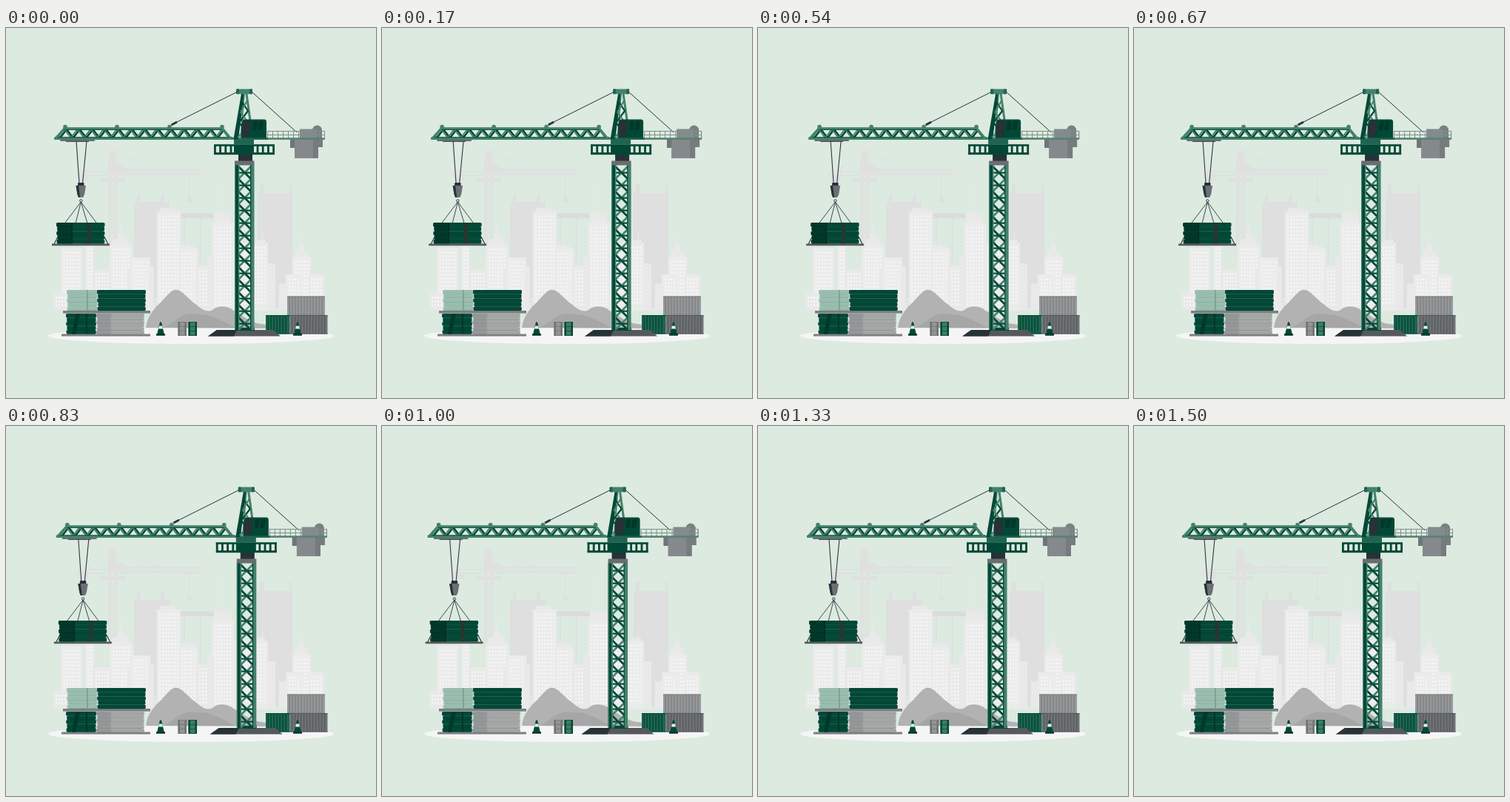
An HTML page for the animation above (1.54 s loop, 500x500 px).

```html
<!DOCTYPE html>
<html lang="en">
<head>
<meta charset="utf-8">
<title>Tower crane</title>
<style>
  html, body { margin: 0; width: 100%; height: 100%; overflow: hidden; background: #dceae0; }
  svg { display: block; width: 100%; height: 100%; }
</style>
</head>
<body>
<svg id="stage" viewBox="0 0 500 500">
  <defs>
    <pattern id="win" width="4" height="5" patternUnits="userSpaceOnUse">
      <rect x="1" y="1.2" width="2.2" height="2.8" fill="#f5f5f5"/>
    </pattern>
  </defs>
</svg>
<script>
const svg = document.getElementById('stage');
const LIGHT = '#45816c', MID = '#1f6450', GREEN = '#024836', DEEP = '#01382a', INK = '#263238';

const rect = (x, y, w, h, fill, rx = 0) =>
  `<rect x="${x}" y="${y}" width="${w}" height="${h}" fill="${fill}" rx="${rx}"/>`;
const shape = (d, fill) => `<path d="${d}" fill="${fill}"/>`;
const line = (d, color, w = 1) =>
  `<path d="${d}" fill="none" stroke="${color}" stroke-width="${w}" stroke-linejoin="round"/>`;
const dot = (x, y, r, fill) => `<circle cx="${x}" cy="${y}" r="${r}" fill="${fill}"/>`;
const group = (body, id = '') => `<g${id && ` id="${id}"`}>${body}</g>`;
const repeat = (n, fn) => Array.from({ length: n }, (_, i) => fn(i)).join('');

// Zigzag along x between two heights
function zigzag(x, step, n, y0, y1) {
  return repeat(n + 1, i => `${i ? 'L' : 'M'}${x + i * step} ${i % 2 ? y1 : y0}`);
}

function tower(x, y, w, bottom, fill = '#ebebeb', windows = true) {
  let out = rect(x, y, w, bottom - y, fill);
  if (windows) {
    const rows = Math.floor((bottom - y - 8) / 5) * 5, cols = Math.floor((w - 4) / 4) * 4;
    out += `<g transform="translate(${x + (w - cols) / 2} ${y + 4})">${rect(0, 0, cols, rows, 'url(#win)')}</g>`;
  }
  return out;
}

// Faint wall panels and floor line
function wall() {
  const c = '#dfeae3';
  return [38, 254].map(x =>
    `<rect x="${x}" y="55" width="204" height="281" rx="4" fill="none" stroke="${c}" stroke-width=".7"/>`).join('') +
    line('M0 382H500', c, .7);
}

function farCrane() {
  const c = '#dfe0df';
  return group(
    line('M139.5 178V300M148.5 178V300', c, 2.5) +
    repeat(12, i => line(`M140 ${180 + i * 10}l8 10m0 -10l-8 10`, c, 1.5)) +
    shape('M139 166h9v3l3 28h-14l2 -28z', c) +
    rect(150, 184, 9, 12, c, 1.5) +
    line('M148 198H263M156 191H259L263 198', c, 2.4) +
    line(zigzag(158, 5, 20, 198, 191), c, 1.5) +
    line('M95 199H138M97 194H137', c, 1.5) +
    rect(98, 197, 13, 10, c) +
    line('M140 168L106 194M148 168L204 190', c, .7) +
    rect(127, 203, 35, 5, c) +
    line('M247 199V229M249 199V229', c, .7) +
    rect(244.5, 229, 6.5, 7, c, 1.5)
  );
}

function city() {
  const far = '#dfdfdf', near = '#e9e9e9';
  return farCrane() +
    shape('M173 235H177V224H181V235H209V225H214V235H221V365H173z', far) +
    shape('M340 223H343V211H348V223H383V210H386V223H387V365H340z', far) +
    rect(236, 250.5, 45, 6.5, '#dbdcdb') + rect(240, 257, 1.5, 60, far) + rect(262, 257, 1.5, 60, far) +
    rect(361, 303, 7, 75, far) +
    rect(154.5, 262, 1, 18, near) + rect(150, 278, 11, 8, near) + rect(144, 285, 22, 9, near) +
    tower(140, 293, 31, 382) +
    tower(74, 297, 29, 382) + tower(107, 292, 12, 382) +
    tower(118, 326, 24, 382, near) + tower(64, 358, 20, 382, near) +
    tower(168, 310, 27, 382) + rect(164, 325, 4, 57, near) + rect(195, 322, 5, 60, near) +
    rect(208, 243, 21, 7, near) + tower(204, 248, 32, 382) +
    rect(243, 278, 1, 17, near) + rect(237, 293, 17, 6, near) + tower(233, 298, 26, 382) +
    tower(258, 322, 16, 382, near) +
    rect(291.5, 205, 1.2, 46, near) + rect(281, 250, 23, 15, near) + tower(278, 263, 30, 382) +
    tower(272, 308, 10, 382, near, false) +
    rect(346, 274, 1, 17, near) + rect(337, 286, 13, 5, near) + tower(308, 290, 46, 382) +
    tower(354, 318, 10, 382, near, false) +
    rect(398.5, 280, 1, 14, near) + rect(395, 292, 8, 9, near) + rect(390, 300, 18, 11, near) +
    tower(387, 309, 25, 382) + tower(378, 333, 22, 382) + tower(408, 333, 22, 382) +
    tower(369, 345, 10, 382, near, false);
}

function hills() {
  return shape('M189 405C191 388 202 377 211 369C218 362 223 354 230 354C239 355 246 367 258 375C266 382 274 386 281 380C287 375 299 376 306 381C319 388 330 398 345 400C356 401 362 404 365 406z', '#b2b2b2') +
    shape('M212 405C224 401 234 389 243 387C252 385 259 388 268 387C283 390 300 400 310 405z', '#a6a6a6') +
    line('M211 369C218 362 223 354 230 354C239 355 246 367 258 375C266 382 274 386 281 380C287 375 299 376 306 381', '#9c9c9c', .5);
}

// Stacked sheets with uneven ends
function stack(x, y, w, h, n, fill, edge) {
  const s = h / n;
  return repeat(n, i => {
    const d = [0, 1.2, .3, 1.4, .6][i % 5];
    return rect(x + d, y + i * s, w - d * 1.4, s, fill, 1.6) +
      line(`M${x + d + 1} ${y + (i + 1) * s - .3}H${x + w - d - 1}`, edge, .6);
  });
}

function piles() {
  return rect(75, 413.5, 120, 3, '#7b7f80') +
    stack(122, 386, 65, 27.5, 6, '#a5a7a7', '#858989') +
    stack(122.5, 386, 20, 27.5, 6, '#959898', '#7f8383') +
    stack(81, 386, 41, 27.5, 5, GREEN, DEEP) +
    shape('M94 386H100L94 413.5H89z', DEEP) + rect(108, 386, 2, 27.5, DEEP) +
    rect(77, 382, 118, 3.6, '#7b7f80') +
    stack(82, 354, 42, 28, 5, '#9abdaf', '#6d9a89') +
    rect(109, 354, 2, 28, '#7da595') +
    stack(123, 354, 66, 28, 5, GREEN, DEEP);
}

function cone(x) {
  return shape(`M${x - 1} 397.5h2l3.8 16h-9.6z`, GREEN) +
    shape(`M${x - 2.1} 402.4h4.2l.9 4h-6z`, '#e8eeea') +
    rect(x - 6, 413, 12, 2.8, DEEP, .5);
}

function barrel(x, fill, shade) {
  return rect(x, 397, 11.5, 19, fill, 1) + rect(x, 397, 2.5, 19, shade, 1) + rect(x + 9, 397, 2.5, 19, shade, 1) +
    repeat(4, i => rect(x, 397 + i * 6.1, 11.5, .7, shade));
}

function container(x, y, w, h, fill, shade) {
  return rect(x, y, w, h, fill) +
    repeat(Math.floor((w - 2) / 4), i => rect(x + 2.4 + i * 4, y + 1.5, 1.4, h - 3, shade)) +
    rect(x, y, w, 1.2, shade) + rect(x, y + h - 1.2, w, 1.2, shade);
}

function yard() {
  return `<ellipse cx="250" cy="416" rx="193" ry="11" fill="#f5f5f5"/>` + hills() + piles() +
    cone(209) + barrel(232.5, '#929494', '#6f7373') + barrel(246.5, '#3d7c67', GREEN) +
    container(380, 362.5, 51, 26, '#969899', '#7e8182') +
    container(351, 388, 32.5, 25.5, MID, GREEN) +
    container(383.5, 388, 51, 25.5, '#6f7375', '#565b5e');
}

function mast() {
  const cell = 17;
  return repeat(13, i => {
    const y = 187 + i * cell;
    return line(`M314 ${y}L331 ${y + cell}`, GREEN, 2.8) +
      line(`M331 ${y}L314 ${y + cell}`, LIGHT, 2.6) +
      rect(314, y + cell / 2 - 1, 17, 2.2, GREEN);
  }) +
    rect(309, 185, 5, 223, GREEN) + rect(309, 185, 1.2, 223, LIGHT) +
    rect(314, 185, 1.4, 223, LIGHT) +
    rect(331, 185, 4.5, 223, LIGHT) + rect(330, 185, 1.3, 223, GREEN);
}

function base() {
  return shape('M273 416.5L285 408H361L371 416.5z', '#55595b') +
    shape('M273 416.5L285 408H312L308 416.5z', INK) + rect(311, 405, 25, 4, GREEN);
}

function deck() {
  return rect(308, 150, 27, 9, MID) + rect(314, 169, 19, 11, INK) +
    rect(309, 179.5, 26.5, 6, '#696d72') +
    rect(308, 157, 27, 14, GREEN) +
    rect(281, 157, 82, 2.8, GREEN) + rect(281, 168.2, 82, 3, GREEN) +
    repeat(12, i => rect(281 + i * 7.2, 157, 2.8, 14, GREEN)) +
    line('M281 157.4H363', LIGHT, .7);
}

function head() {
  return shape('M318 89H322L314 150H307.5z', GREEN) +
    line('M322 89L317 150', LIGHT, 1.6) + line('M325 89L333.5 150', LIGHT, 3) +
    line('M319 100L327 112L315 128L331 146', GREEN, 2.2) +
    line('M326 98L317 114L329 130L313 148', LIGHT, 2) +
    rect(311, 82.5, 22, 6.8, LIGHT, 1) + rect(311, 82.5, 4, 6.8, MID, 1) + rect(329, 82.5, 4, 6.8, MID, 1);
}

function cab() {
  return shape('M320 123.5H349Q352 123.5 352 127V150.5H318V132z', GREEN) +
    shape('M321 125H331L329 147H318.5V133z', INK) +
    shape('M334 126H340L338 138H333z', DEEP) + shape('M342 126H348L346 138H340z', DEEP) +
    rect(318, 148.5, 36, 2.5, MID);
}

function jib() {
  return line(zigzag(73, 8.875, 25, 148.5, 137), GREEN, 2.6) +
    line(zigzag(70, 8.875, 26, 148.5, 136.5), LIGHT, 2) +
    rect(78, 134.2, 215, 3.6, LIGHT) + line('M79 137.4H293', GREEN, .9) +
    rect(65, 147.8, 253, 3.2, LIGHT) + line('M66 147.8H306', GREEN, 1) +
    line('M66.5 149.5L79.5 135M292 135L304 149.5', LIGHT, 2.8) +
    [80, 150, 221, 292].map(x => dot(x, 133.5, 2.8, LIGHT)).join('');
}

function counter() {
  const rail = '#7e9189';
  return dot(420.5, 138, 6.5, '#7b7f82') + rect(414, 137, 13, 12, '#7b7f82') +
    rect(397, 136.5, 23, 14, '#85898c') +
    shape('M384 150H428V161H422V176H390V162H384z', '#85898c') +
    shape('M415 150H428V161H422V176H415z', '#777b7f') + rect(384, 150, 6, 12, '#70747a') +
    line('M353 139.5H430.5V150M353 144.5H430', rail, 1) +
    repeat(12, i => line(`M${353.5 + i * 7} 139V150`, rail, 1)) +
    rect(352, 148.3, 79, 2.6, '#588272');
}

function hoist() {
  const cord = '#30383c';
  return rect(73, 151, 47, 2, '#6b7074', 1) + rect(81, 152.5, 31, 1.5, '#50565a') +
    line('M95 153L99 210M109 153L103.5 210', cord, 1.1) +
    rect(97, 209, 8.5, 5, INK, 1) + shape('M94.5 213H108L106 225L104 229H98L96.5 225z', '#6b6f75') +
    shape('M94.5 213H98L100 229H98L96.5 225z', INK) +
    `<circle cx="101.3" cy="233.5" r="1.7" fill="none" stroke="${cord}"/>` +
    line('M101.3 235L80 263L65 292M101.3 235L94 264M101.3 235L110 264M101.3 235L122 263L138 292', cord, .9) +
    stack(68, 263, 65.5, 28.5, 5, GREEN, DEEP) +
    stack(68.4, 263, 22, 28.5, 5, DEEP, '#022b21') +
    rect(109.5, 263, 5.5, 28.5, '#26372f') + rect(88.5, 263, 1.2, 28.5, '#022b21') +
    line('M70 282L65 292M133 282L138 292', cord, .9) +
    rect(62, 291.5, 78, 2.7, '#555c5f');
}

function crane() {
  return line('M229 128L313 86M333 87L393 141', INK, 1) + line('M223.5 131L231 127', INK, 2.6) +
    counter() + base() + mast() + jib() + head() + deck() + cab() + hoist();
}

svg.insertAdjacentHTML('beforeend', wall() + city() + yard() + group(crane(), 'crane') + cone(394));

const rig = document.getElementById('crane');
const LOOP = 1540, FPS = 24, SHAKE = 1500;
const stops = [0, 1, 2, -4, 4, -4, 4, -4, 2, 1, 0];

// cubic-bezier(.25, .1, .25, 1)
function ease(x) {
  let lo = 0, hi = 1;
  for (let i = 0; i < 24; i++) {
    const s = (lo + hi) / 2, r = 1 - s;
    if (.75 * r * r * s + .75 * r * s * s + s ** 3 < x) lo = s; else hi = s;
  }
  const r = 1 - lo;
  return .3 * r * r * lo + 3 * r * lo * lo + lo ** 3;
}

function offset(ms) {
  const p = ms / SHAKE * 10, i = Math.min(9, Math.floor(p));
  return stops[i] + (stops[i + 1] - stops[i]) * ease(p - i);
}

function draw(now) {
  const step = Math.min(36, Math.floor((now % LOOP + 5) * FPS / 1000));
  rig.setAttribute('transform', `translate(${offset(step * 1000 / FPS).toFixed(3)} 0)`);
}

let start;
function tick(now) {
  start ??= now;
  draw(now - start);
  requestAnimationFrame(tick);
}
draw(0);
requestAnimationFrame(tick);
</script>
</body>
</html>
```
